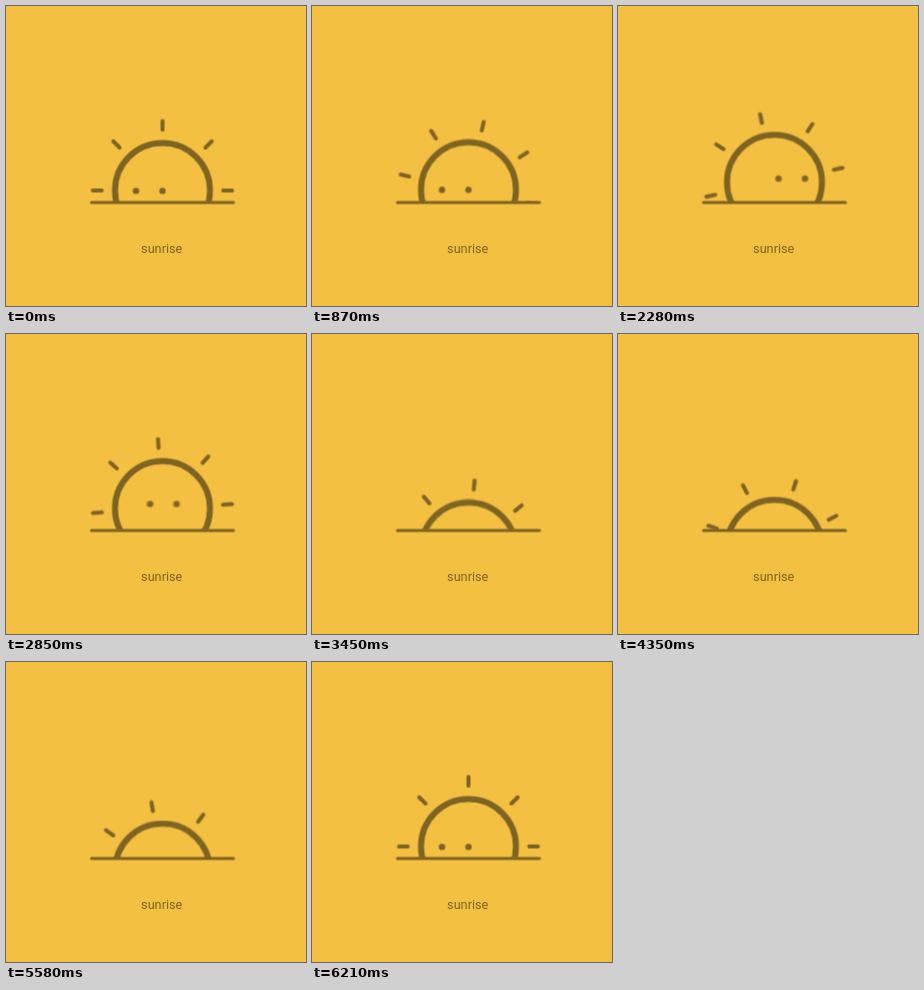
An HTML page that plays this animation: 300 by 300 pixels, repeating every 6240 ms.

```html
<!DOCTYPE html>
<html lang="en">
<head>
<meta charset="utf-8">
<title>sunrise</title>
<style>
  :root { --sky: #f4c042; --ink: #7d621f; --loop: 6240ms; }
  html, body { margin: 0; width: 100%; height: 100%; overflow: hidden; background: var(--sky); }
  svg { display: block; width: 100vw; height: 100vh; }

  .ring, .rays, .horizon { fill: none; stroke: var(--ink); stroke-linecap: round; }
  .ring { stroke-width: 6; }
  .rays { stroke-width: 4; }
  .horizon { stroke-width: 3; }
  .eyes { fill: var(--ink); }
  text { font: 400 12.7px Roboto, "Liberation Sans", sans-serif; fill: var(--ink); text-anchor: middle; }

  /* Slightly offset copies add up to motion blur. */
  .shutter { isolation: isolate; }
  .sample { opacity: .2; mix-blend-mode: plus-lighter; }

  .rise, .rays, .look, .lift, .horizon {
    animation: var(--loop) linear var(--lag, 0ms) infinite both;
  }
  .rise { animation-name: rise; }
  .rays { animation-name: spin; }
  .look { animation-name: look; }
  .lift { animation-name: lift; }
  .horizon { animation-name: stretch; }

  @keyframes rise {
    0% { transform: translateY(0); animation-timing-function: cubic-bezier(.7, 0, .6, 1); }
    48.08%, 48.56% { transform: translateY(-10px); }
    48.56% { animation-timing-function: cubic-bezier(.7, 0, .3, 1); }
    52.4% { transform: translateY(31.5px); animation-timing-function: cubic-bezier(.5, 0, .5, 1); }
    91.35% { transform: translateY(24.5px); animation-timing-function: cubic-bezier(.6, 0, .3, 1); }
    97.1%, 100% { transform: translateY(0); }
  }
  @keyframes spin {
    0% { transform: rotate(0deg); }
    99.52%, 100% { transform: rotate(90deg); }
  }
  @keyframes look {
    0%, 17.3% { transform: translateX(0); }
    17.3%, 43.83% { animation-timing-function: cubic-bezier(.7, 0, .3, 1); }
    22.1%, 43.83% { transform: translateX(30.5px); }
    47.28%, 100% { transform: translateX(0); }
  }
  @keyframes lift {
    0% { transform: translateY(0); animation-timing-function: cubic-bezier(.7, 0, .6, 1); }
    48.08%, 53% { transform: translateY(-5px); }
    56%, 100% { transform: translateY(0); }
  }
  @keyframes stretch {
    0%, 91.8% { transform: scaleX(1); animation-timing-function: ease-in-out; }
    94.6% { transform: scaleX(1.172); animation-timing-function: ease-in-out; }
    98.6%, 100% { transform: scaleX(1); }
  }
</style>
</head>
<body>
<svg viewBox="0 0 300 300">
  <clipPath id="above"><rect width="300" height="195.5"/></clipPath>
  <g clip-path="url(#above)">
    <g class="shutter" transform="translate(156.5 184.5)">
      <g class="sample">
        <g class="rise">
          <circle class="ring" r="47.5"/>
          <g class="rays"></g>
          <g class="lift">
            <g class="look eyes">
              <circle cx="-26.5" cy=".4" r="3.2"/>
              <circle cx="0" cy=".4" r="3.2"/>
            </g>
          </g>
        </g>
      </g>
    </g>
  </g>
  <g transform="translate(156.5 196.5)">
    <path class="horizon" d="M-71 0H71"/>
  </g>
  <text x="155.7" y="246.5">sunrise</text>
</svg>
<script>
  const sample = document.querySelector('.sample');
  sample.querySelector('.rays').innerHTML = Array.from({ length: 8 }, (_, i) =>
    `<path d="M0-60.7V-69.6" transform="rotate(${i * 45})"/>`).join('');

  for (const lag of [-6, -3, 3, 6]) {
    const copy = sample.cloneNode(true);
    copy.style.setProperty('--lag', lag + 'ms');
    sample.parentNode.append(copy);
  }
</script>
</body>
</html>
```
